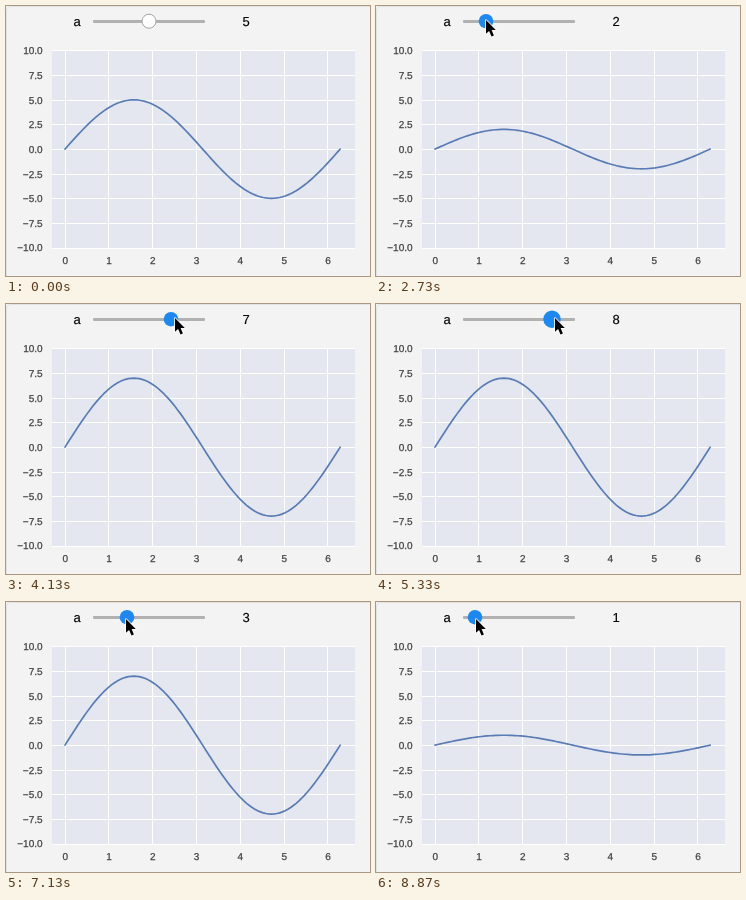
Animation, 364 px wide and 270 px high, one loop 9200 ms. Source, as an HTML page:

```html
<!DOCTYPE html>
<html lang="en">
<head>
<meta charset="utf-8">
<title>Sine amplitude slider</title>
<style>
  html, body { margin: 0; width: 100%; height: 100%; overflow: hidden; background: #f3f3f3; }
  svg { display: block; width: 364px; height: 270px; }
  text { font-family: "Liberation Sans", Arial, sans-serif; text-rendering: geometricPrecision; }
  .tick { font-size: 10px; fill: #404040; stroke: #404040; stroke-width: 0.25px; }
  .label { font-size: 13px; fill: #000; stroke: #000; stroke-width: 0.15px; }
</style>
</head>
<body>
<svg viewBox="0 0 364 270">
  <rect x="0.5" y="0.5" width="400" height="300" rx="4" fill="#f3f3f3" stroke="#e2e2e2"/>
  <rect x="46" y="45" width="303" height="197" fill="#e5e7f0"/>
  <g id="grid" stroke="#fff"></g>
  <g id="ticks"></g>
  <path id="curve" fill="none" stroke="#5a7cb5" stroke-width="1.7" stroke-linejoin="round" stroke-linecap="round"/>
  <text class="label" x="67.5" y="20">a</text>
  <text class="label" id="value" x="236.4" y="20"></text>
  <rect x="87" y="14" width="112" height="3" rx="1" fill="#b1b1b1"/>
  <circle id="knob" cy="15.2"/>
  <path id="cursor" d="M0 0V13.8L3.1 10.9 5.5 16.4 7.9 15.4 5.6 10H9.8Z"
    fill="#000" stroke="#fff" stroke-width="1.6" stroke-linejoin="round" paint-order="stroke"/>
</svg>
<script>
const TICK = 1000 / 15, TICKS = 138, REDRAW = 6;
const $ = id => document.getElementById(id);
const px = x => 59 + 43.8 * x;
const py = y => 143.1 - 9.85 * y;
const clamp = f => Math.min(1, Math.max(0, f));
const easeOut = f => 1 - (1 - f) ** 1.5;

// Pointer moves in ticks; a drag's plots follow from tick `plot`, one every REDRAW ticks
const approach = [
  { from: 2, to: 3, x: 113, y: 15 },
  { from: 5, to: 14, x: 143, y: 14 }
];
const drags = [
  { from: 17, to: 24, x: 110, y: 14, plot: 27, amps: [4, 3, 2] },
  { from: 44, to: 53, x: 169, y: 14, plot: 50, amps: [3, 4, 7] },
  { from: 74, to: 80, x: 179, y: 14, plot: 85, amps: [8] },
  { from: 96, to: 104, x: 120, y: 17, plot: 103, amps: [7, 6, 5, 3] },
  { from: 120, to: 125, x: 100, y: 17, plot: 127, amps: [2, 1] }
];
const HOVER = 11;
const pressTick = d => d.from - 2;
const releaseTick = d => d.to + 3;

function add(parent, tag, attrs, text) {
  const el = document.createElementNS("http://www.w3.org/2000/svg", tag);
  for (const k in attrs) el.setAttribute(k, attrs[k]);
  if (text !== undefined) el.textContent = text;
  parent.appendChild(el);
}

function set(id, attrs) {
  for (const k in attrs) $(id).setAttribute(k, attrs[k]);
}

function drawAxes() {
  for (let x = 0; x <= 6; x++) {
    const gx = Math.floor(px(x)) + 0.5;
    add($("grid"), "line", { x1: gx, x2: gx, y1: 45, y2: 242 });
    add($("ticks"), "text", { class: "tick", x: px(x) + 0.2, y: 257.6, "text-anchor": "middle" }, x);
  }
  for (let y = -10; y <= 10; y += 2.5) {
    const gy = Math.floor(py(y) + 0.4) + 0.5;
    add($("grid"), "line", { x1: 46, x2: 349, y1: gy, y2: gy });
    add($("ticks"), "text", { class: "tick", x: 36.6, y: py(y) + 3.8, "text-anchor": "end" },
      y.toFixed(1).replace("-", "\u2212"));
  }
}

function sinePath(a) {
  let d = "";
  for (let i = 0; i <= 100; i++) {
    const x = i / 100 * 2 * Math.PI;
    d += (i ? "L" : "M") + px(x).toFixed(2) + " " + py(a * Math.sin(x)).toFixed(2);
  }
  return d;
}

function pointerAt(n) {
  let x = 100, y = 14;
  for (const m of [...approach, ...drags]) {
    const f = easeOut(clamp((n - m.from) / (m.to - m.from)));
    x += (m.x - x) * f;
    y += (m.y - y) * f;
  }
  return [x, y];
}

function amplitudeAt(n) {
  let amp = 5;
  for (const { plot, amps } of drags) {
    const i = Math.floor((n - plot) / REDRAW);
    if (i >= 0) amp = amps[Math.min(i, amps.length - 1)];
  }
  return amp;
}

function render(ms) {
  const n = Math.floor((ms + 5) / TICK) % TICKS;
  const [x, y] = pointerAt(n);
  const value = n < pressTick(drags[0]) ? 5 : Math.round((x - 88) / 11);
  const pressed = drags.some(d => n >= pressTick(d) && n < releaseTick(d));
  const lit = n >= HOVER;

  set("curve", { d: sinePath(amplitudeAt(n)) });
  $("value").textContent = value;
  set("knob", {
    cx: 88 + 11 * value,
    r: pressed ? 8.7 : lit ? 7.3 : 7,
    fill: lit ? "#1f88ee" : "#fff",
    stroke: lit ? "none" : "#a2a2a2"
  });
  set("cursor", {
    transform: `translate(${x.toFixed(1)} ${y.toFixed(1)})`,
    visibility: n < approach[0].from ? "hidden" : "visible"
  });
}

drawAxes();
const start = performance.now();
function loop() {
  render((performance.now() - start) % (TICK * TICKS));
  requestAnimationFrame(loop);
}
render(0);
requestAnimationFrame(loop);
</script>
</body>
</html>
```
